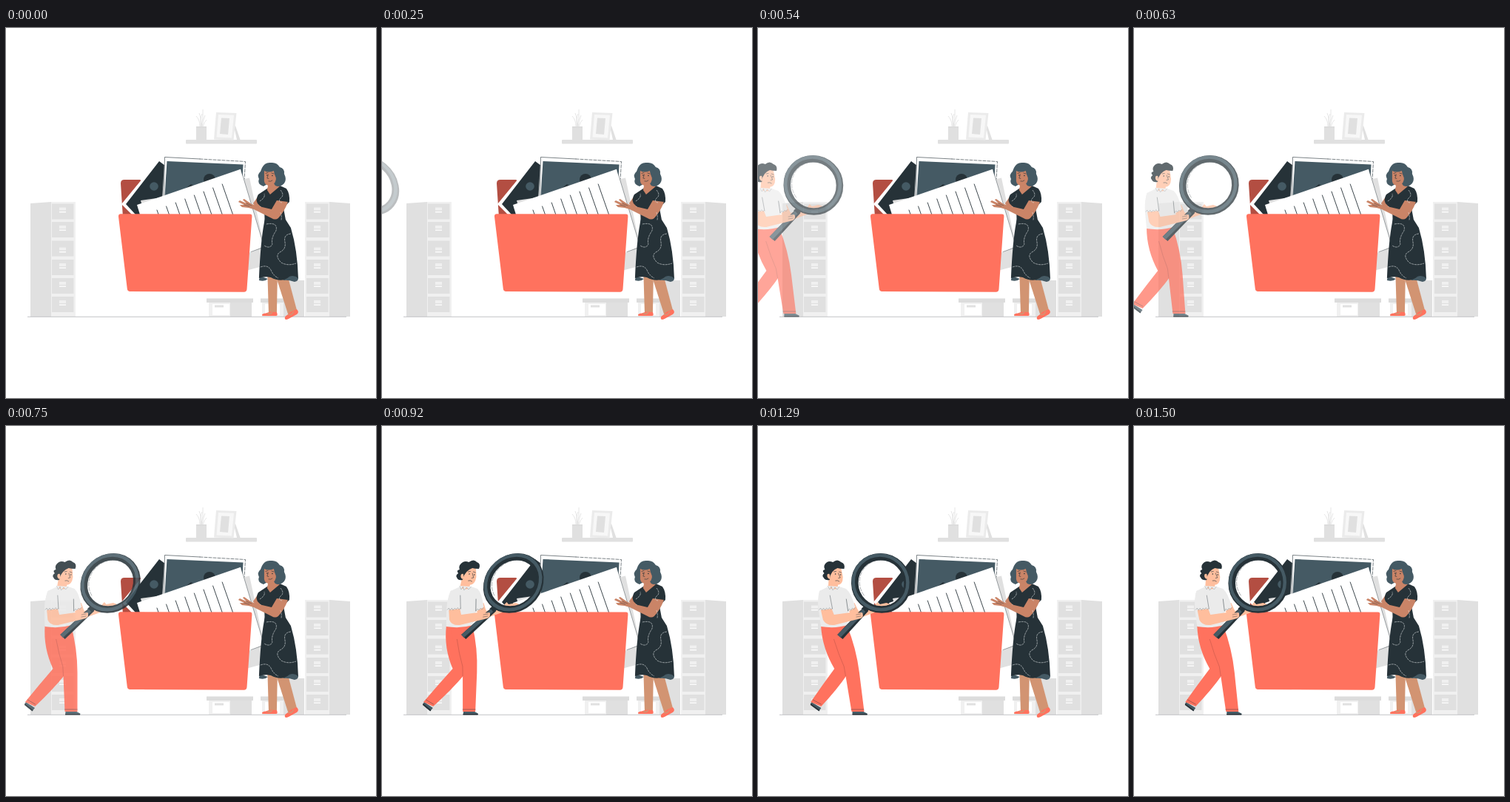
An HTML page that plays this animation: 500x500 px, repeating every 1.54 s.

```html
<!DOCTYPE html>
<html lang="en">
<head>
<meta charset="utf-8">
<title>Searching a folder</title>
<style>
  html, body { margin: 0; width: 100%; height: 100%; overflow: hidden; background: #fff; }
  svg { display: block; width: 100vw; height: 100vh; stroke-width: .6; }
  .ink { fill: #263238; } .slate { fill: #455a64; } .coral { fill: #ff725e; }
  .g1 { fill: #f0f0f0; } .g2 { fill: #e0e0e0; } .g3 { fill: #dcdcdc; } .paper { fill: #fff; }
  .tan { fill: #ca8467; } .leg { fill: #d29472; } .peach { fill: #ffbe9d; } .shirt { fill: #ebebeb; }
  .line { fill: none; stroke: #263238; stroke-linecap: round; }
  .fold { fill: none; stroke: #c4584a; }
  .cuff { fill: none; stroke: #8b9093; }
  .pale { fill: none; stroke: #dfe4e6; stroke-dasharray: 3 .8; }
  .twig { fill: none; stroke: #e0e0e0; stroke-width: .8; }
</style>
</head>
<body>
<svg viewBox="0 0 500 500" xmlns="http://www.w3.org/2000/svg">
  <g id="room">
    <path class="g2" d="M33 237L61 235V390H33ZM465 237L437 235V390H465Z"/>
    <path class="g1" d="M61 235H94V390H61ZM404 235H437V390H404Z"/>
    <g id="drawers"></g>

    <rect class="g2" x="243" y="151" width="96" height="5.5" rx="1"/>
    <path class="g2" d="M308 133L310 132L316.500 151H312Z"/>
    <path fill="#ebebeb" d="M284 114L311.500 115L307.500 151.500L281 150.500Z"/>
    <path fill="#f7f7f7" d="M287 117L308 117.800L305 148.500L284.500 147.500Z"/>
    <path class="g2" d="M291 121.500L302 122L300 144L289 143Z"/>
    <path class="twig" d="M262 133Q262 124 257 119M263 133Q264 121 261 115M264 133Q267 120 266 110M265 133Q266 125 269 118M266 133Q268 127 271 124M264 133Q262 122 265 116"/>
    <path class="g2" d="M257 133H271V151H257Z"/>
    <path class="g3" d="M257 133H271V135H257Z"/>

    <path class="g2" d="M375 341H403V390H375Z"/>
    <path class="g1" d="M274 370H303V390H274ZM346 370H375V390H346Z"/>
    <path class="g2" d="M303 370H332V390H303Z"/>
    <path class="g3" d="M271 365.500H334V371H271ZM344 365.500H376V371H344Z"/>
    <path class="paper" d="M279 373H302V388H279ZM350 373H370V388H350Z"/>
    <path class="g2" d="M282 374.500H294V377.500H282Z"/>
    <path d="M29 390.300H460" stroke="#9a9d9f"/>
  </g>

  <g id="folder">
    <path d="M155 210Q155 205 160 205H181L187 209H240V256H158Z" fill="#b34e42"/>
    <path class="paper" d="M205 178.500L219 189L190 256H174L156 238Z"/>
    <path class="ink" d="M207 180L219 189V232L185 252H175L162 238Z"/>
    <circle class="slate" cx="200" cy="214" r="5.800"/>
    <path class="paper" d="M214.500 174.500L323.500 180L319 252H210Z"/>
    <path class="line" d="M213 232L214.500 174.500L262 177"/>
    <path class="line" d="M262 177L323.500 180.500L322 206" stroke-dasharray="4 2"/>
    <path class="slate" d="M217.500 180L320.500 184.500L317 250H213Z"/>
    <circle class="ink" cx="275" cy="205" r="8"/>
    <path class="ink" d="M236 222L250 211L266 222Z"/>
    <path class="g2" d="M182 233L214 228.500L216 236L184 241Z"/>
    <path class="g2" d="M310 207L329 202.500L354 320L326 327.500Z"/>
    <path class="paper" d="M177 239L317 190.800L348.500 295L326 305L184 262Z"/>
    <path class="line" d="M318 193L348 293M346 297L331 302.500" opacity=".7"/>
    <path class="line" id="rows" stroke-width=".9"/>
    <path class="coral" d="M155 251.200L329.800 251.600Q332.700 251.600 332.400 255L325.500 353Q325.200 356.700 321.500 356.700L167.500 355.900Q164.200 355.800 163.800 352.500L152 255Q151.600 251.200 155 251.200Z"/>
  </g>

  <g id="woman" transform="translate(.9 0)">
    <path class="leg" d="M352.500 333H366L365 385L364 387H354L354 384Z"/>
    <path class="leg" d="M364 336H380L392 381L388 387L380 386Z"/>
    <path class="coral" d="M345 388Q345 386 350 385.500L356 383.500L365 384Q367 389 364 389H347Q345 389 345 388ZM376 393Q375 390 379 388L383 384L392 380Q396 384 392 387L381 393Q377 395 376 393Z"/>
    <path d="M352 385.500Q356 388 359 384M380 387Q385 389 388 383" fill="none" stroke="#d29472" stroke-width="1.500"/>
    <path class="tan" d="M342 224L348 231L340 246L333 237Z"/>
    <path class="slate" d="M376 333Q389 333 394 337Q395 342 389 343Q380 340 374 341Z"/>
    <path class="slate" d="M342 335L341 341Q349 343 353 339Z"/>
    <path class="ink" d="M352 217L340 225Q336 232 339 237L346 244Q350 253 348 263Q343 289 341 338Q349 335 357 337Q372 345 382 336Q388 333 394 338Q393 300 384 270L377 259L374 243L382 235Q383 224 378 217L367 212Z"/>
    <path class="tan" d="M354 208L366 203L369 214L356 225L352 219Z"/>
    <path class="slate" d="M345 189Q349 181 357 182Q365 181 369 188Q376 190 375 197Q379 205 375 210Q369 216 363 213L359 207L347 214Q338 211 341 204Q338 198 343 194Z"/>
    <path class="tan" d="M348 191Q354 195 361 192Q365 194 364 200Q365 211 356 213Q349 213 348 207Z"/>
    <path class="slate" d="M346 190Q356 184 364 190Q369 197 367 208Q362 200 361 193Q354 196 348 193Z"/>
    <path class="line" d="M350 196.500L353 195.500M358 196L361 197M353.500 198L352 203L354 203.500M354 207Q357 208 359 206"/>
    <circle class="ink" cx="352" cy="199" r=".8"/><circle class="ink" cx="359" cy="199.500" r=".8"/>
    <path class="tan" d="M365 233L380 235Q376 247 367 257Q363 260 358 257L334 245L327 243L318 242L315 239L321 239L313 235L315 233L324 237L319 232L321 231L331 238L341 241L358 245Z"/>
    <path class="line" d="M321 239L328 241M324 237L331 240" stroke-width=".4"/>
    <path class="pale" d="M370 219Q376 226 370 230Q366 235 372 236M342 234Q350 229 348 224M351 265Q367 262 364 274Q357 284 359 292Q356 299 348 294M384 278Q374 279 376 289Q378 299 369 303Q362 308 371 317Q380 322 391 318M343 323Q354 319 358 329Q361 335 367 338M370 249Q372 254 371 260"/>
  </g>

  <g id="man">
    <g id="body">
      <path class="peach" d="M118 243L130 239L135 250L156 244L161 238L164 241L173 239L179 241L171 244L162 250L138 259L127 258Z"/>
      <path class="slate" d="M69 373L82 381L79 385Q73 381 67.500 376ZM124 385H137L144 388.500Q145 390 142 390H124Z"/>
      <path class="ink" d="M68 375L80 384L79 385.500L67.500 377ZM124 389H144V390.500H124Z"/>
      <path class="coral" d="M84 270H108L118 336Q104 356 82 379L68 373Q85 349 101 328Q85 300 84 270Z"/>
      <path class="coral" d="M91 271L119 269Q131 300 134.500 333L140 386H123L116 338Q105 312 96 290Z"/>
      <path class="fold" d="M101 288Q107 309 114 325L116 338"/>
      <path class="line" d="M71 370L82 376M122.500 383H139.500" stroke-width=".4"/>
      <path class="shirt" d="M93 218L83 223Q80 233 81 247L84 271Q104 274 120 269L121 251L131 245Q126 226 119 220L110 217Z"/>
      <path class="line" d="M121 250L119 234" stroke-width=".5"/>
      <path class="peach" d="M96 204L108 207L108 219Q101 223 95 217Z"/>
      <path class="shirt" d="M94 216L97 221L99 217L101 222L104 218L107 221L110 217"/>
      <path class="cuff" d="M94 216L97 221L99 217L101 222L104 218L107 221L110 217" stroke-width=".4"/>
      <path class="peach" d="M95 194Q104 187 113 193L115 204Q115 215 107 215Q100 215 97 207L93 207Z"/>
      <path class="ink" d="M91 187Q95 181 102 184Q108 179 113 184Q119 186 117 193Q111 193 108 192Q103 194 101 197L98 202L97 208Q91 209 89 205Q86 202 90 199Q86 195 91 194Q89 190 91 187Z"/>
      <path class="peach" d="M97 200Q93 199 94 204Q96 208 98 206Z"/>
      <path class="line" d="M103 197L106 196.500M110 197L113 198M109 199L111.500 205L109 205.500M105 209Q108 208 110 210"/>
      <circle class="ink" cx="105" cy="200" r=".8"/><circle class="ink" cx="112" cy="201" r=".8"/>
    </g>
    <g id="lens">
      <path class="ink" d="M139 247L146 240L151 246L146 252Z"/>
      <path class="ink" d="M136 251L143 244.500L148.500 250L113 288L106 282Z"/>
      <path class="slate" d="M137 251L141 247.500L144.500 251L110 286L106 282Z"/>
      <circle cx="166.500" cy="212.400" r="35.600" fill="none" stroke="#263238" stroke-width="9.600"/>
      <circle cx="165.700" cy="211.300" r="36.800" fill="none" stroke="#455a64" stroke-width="4.400"/>
      <path class="line" d="M143 229Q132 212 142 195Q152 181 168 181" stroke-width=".4" stroke-dasharray="5 2"/>
    </g>
    <g id="arm">
      <path class="peach" d="M84 247L99 247L102 255L124 252L132 247L135 249L131 253L140 252Q143 257 138 260L126 263L102 269Q91 270 87 262Z"/>
      <path class="shirt" d="M83 223Q91 219 97 228L100 247L82 249Q80 234 83 223Z"/>
      <path class="line" d="M97 229L100 247M132 255L138 254M132 258L138 257" stroke-width=".4"/>
      <path class="cuff" d="M82 248.500L84 246L86 249L88 246L90 249L92 246L94 248L96 245.500L98 248L100 246M121 250L123 247L125 249L127 246L129 248L131 245" stroke-width=".5"/>
    </g>
  </g>
</svg>
<script>
const $ = id => document.getElementById(id);
const box = (cls, x, y, w, h) => `<rect class="${cls}" x="${x}" y="${y}" width="${w}" height="${h}"/>`;

const tops = [237.5, 262, 287.5, 313, 338, 363];
$('drawers').innerHTML = [62, 406].map(x => tops.map((y, i) => {
  const drop = i === 2 ? 4 : 0;
  return box('g2', x, y, 29.5, 21) + box('g1', x + 10, y + 5 + drop, 9, 4) +
    box('paper', x + 10, y + 10.5 + drop, 9, 1.3);
}).join('')).join('');

let rows = '';
for (let i = 0; i < 8; i++) {
  const x = 204 + i * 12.6, y = 246 - i * 5;
  rows += `M${x} ${y}L${x + (252 - y) * .35} 252`;
}
$('rows').setAttribute('d', rows);

const LOOP = 1540, FPS = 24, PIVOT = 281, HOME = 1.3;
const mix = (a, b, p) => a + (b - a) * Math.min(1, Math.max(0, p));
const man = $('man');

// Slide in while leaning, swing past upright, then settle.
function draw(time) {
  const step = Math.min(36, Math.floor(time * FPS / 1000 + .1));
  const ms = step * 1000 / FPS + 28;
  const slide = mix(0, 1, ms / 900);
  const lean = ms < 900 ? mix(20, -10, slide)
    : ms < 1200 ? mix(-10, 2, (ms - 900) / 300)
    : mix(2, 0, (ms - 1200) / 300);
  const k = Math.tan(lean * Math.PI / 180);
  const x = HOME - 250 * (1 - slide) - k * PIVOT;
  man.setAttribute('transform', `matrix(1 0 ${k} 1 ${x} 0)`);
  man.setAttribute('opacity', slide);
}

const start = performance.now();
function tick() {
  draw((performance.now() - start) % LOOP);
  requestAnimationFrame(tick);
}
tick();
</script>
</body>
</html>
```
